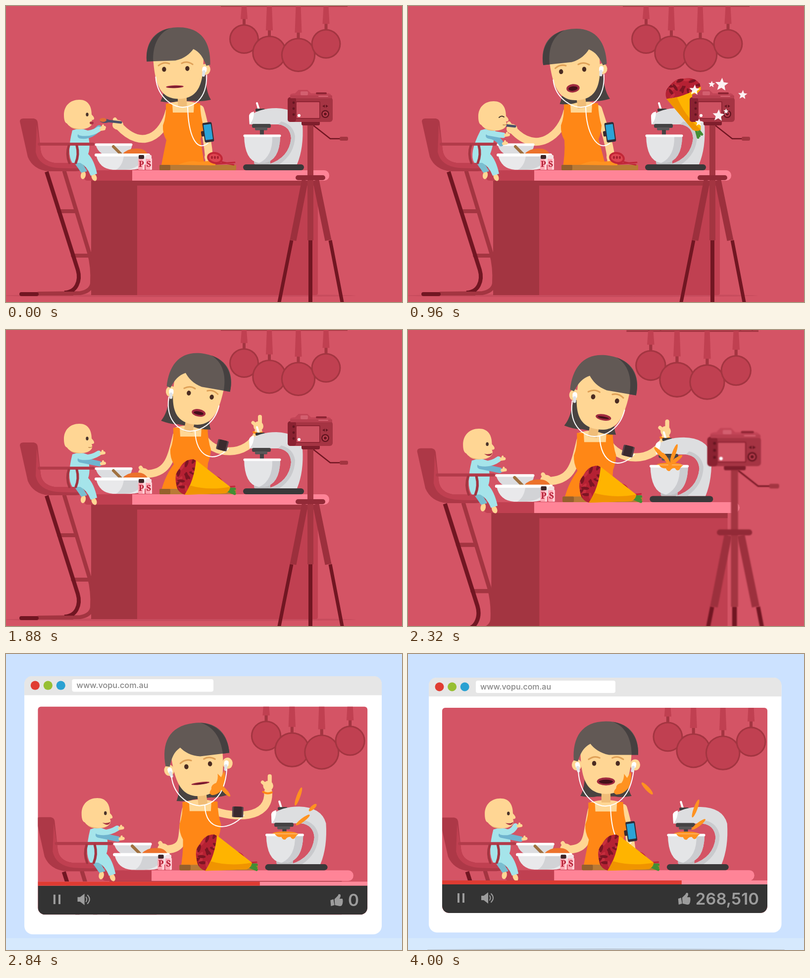
Animation, 800 px wide and 600 px high, one loop 4040 ms. Source, as an HTML page with a canvas:

```html
<!DOCTYPE html>
<html>
<head>
<meta charset="utf-8">
<style>
html, body { margin: 0; width: 100%; height: 100%; overflow: hidden; background: #d45465; }
canvas { display: block; width: 800px; height: 600px; }
</style>
</head>
<body>
<canvas id="stage" width="800" height="600"></canvas>
<script>
const stage = document.getElementById('stage'), c = stage.getContext('2d');
const LOOP = 4040, STEP = 40, ZOOM = 2160, SETTLED = 2840, COUNT = 3120;
const WALL = '#d45465', RED = '#c04051', DEEP = '#a33541', WINE = '#711622', PINK = '#ff8497';
const SKIN = '#ffd694', SHADE = '#f0bd78', ORANGE = '#ff8716', SAUCE = '#ff9220', MINT = '#a5e4ea';
const { sin, cos, abs, min, max, floor, PI } = Math;

const fill = (d, color) => { c.fillStyle = color; c.fill(new Path2D(d)); };
const line = (d, color, w, cap = 'round') => {
  c.strokeStyle = color; c.lineWidth = w; c.lineCap = cap; c.lineJoin = 'round';
  c.stroke(new Path2D(d));
};
const oval = (x, y, rx, ry, color, turn = 0) => {
  c.fillStyle = color; c.beginPath(); c.ellipse(x, y, rx, ry, turn, 0, 7); c.fill();
};
const box = (x, y, w, h, r, color) => {
  c.fillStyle = color; c.beginPath(); c.roundRect(x, y, w, h, r); c.fill();
};
const group = (draw, x = 0, y = 0, turn = 0, sx = 1, sy = sx) => {
  c.save(); c.translate(x, y); c.rotate(turn * PI / 180); c.scale(sx, sy); draw(); c.restore();
};
const mix = (a, b, k) => Array.isArray(a) ? a.map((v, i) => mix(v, b[i], k)) : a + (b - a) * k;
const smooth = k => k * k * (3 - 2 * k);
// Eased value from alternating times and values
function key(t, ...ks) {
  if (t <= ks[0]) return ks[1];
  for (let i = 2; i < ks.length; i += 2)
    if (t < ks[i]) return mix(ks[i - 1], ks[i + 1], smooth((t - ks[i - 2]) / (ks[i] - ks[i - 2])));
  return ks[ks.length - 1];
}
// The baby leans in for a bite and the feeding hand follows
const bite = t => key(t, 0, 0, 720, 1, 1040, 1, 1320, 0);

function room() {
  c.fillStyle = WALL; c.fillRect(-400, -300, 1600, 1200);
  line('M434 0H690M477-20V0M500-20V0M655-20V0M678-20V0', DEEP, 3, 'butt');
  [481, 532, 590.5, 646.5].forEach((x, i) => {
    const y = 67 + 34 * sin(i * .95), r = 28.5 + 5.5 * sin(i * 1.05), h = y - r - 12;
    line(`M${x} ${h - 2}V${y - r}`, DEEP, 6, 'butt');
    fill(`M${x - 5} 0H${x + 5}L${x + 7} ${h}H${x - 7}Z`, RED);
    oval(x, y, r + 1.5, r + 1.5, DEEP);
    oval(x, y, r - 1.5, r - 1.5, RED);
  });
  oval(350, 587, 357, 3, '#c74c5d');
}

// Drawn around the middle of the eye line; turn runs from -1 (left) to 1 (right)
function head(t, turn) {
  const side = turn < 0 ? -1 : 1, a = abs(turn);
  const ear = x => {
    oval(x, 3, 10, 11, SKIN);
    group(() => { box(-5, -8, 9, 13, 5, '#fff'); box(-4, 0, 6, 13, 3, '#dfe3e8'); }, x * .96, 5, x * .2);
  };
  group(() => fill('M-42 10C-42 40-44 52-51 65Q-30 69-18 66H18Q30 69 51 65C44 52 42 40 42 10Z', '#494341'), -4 * turn);
  box(3 * turn - 9, 48, 18, 30, 0, SHADE);
  ear(side * (58 - 20 * a));
  group(() => {
    fill('M-51-40C-51 20-45 61 0 61C45 61 51 20 51-40Z', SKIN);
    if (t >= 2480)
      fill('M50 16L42 29L36 21Q36 32 31 39Q20 41 20 50Q12 58 20 62Q33 63 44 50Q51 40 50 16Z', SAUCE);
  }, 8 * turn);
  ear(-side * (58 - 12 * a));
  group(() => {
    fill('M-64-6C-67-52-48-84 0-84C45-84 66-57 64-17H6C-12-20-24-30-31-39C-44-32-50-22-56-4Z', '#625955');
    fill('M14-83C46-78 66-52 64-17H51C51-50 38-74 14-83Z', '#454040');
  }, 8 * turn, 0, 0, side, 1);
  for (const s of [-1, 1]) {
    const x = 14 * turn + s * 23.5;
    oval(x, 0, 4.2, 5, '#4b2c22');
    line(`M${x - s * 11}-11Q${x}-16 ${x + s * 11}-8`, '#dfa158', 3);
  }
  const open = t < SETTLED ? .5 - .5 * cos((t - SETTLED) * PI / 205) : key(t, SETTLED, 0, 3100, .85);
  const w = 18 - 5 * open * a, h = 2.5 + 6.5 * open;
  oval(17 * turn, 36, w, h, '#a02b40');
  oval(17 * turn, 36.5, w - 4, max(h - 4, .7), '#431019');
}

function limb([sx, sy, ax, ay, bx, by, hx, hy]) {
  line(`M${sx} ${sy}C${ax} ${ay} ${bx} ${by} ${hx} ${hy}`, SKIN, 16);
}

function woman(t) {
  const b = key(t, 0, 358, 960, 350, 1180, 350, 1460, 373, 2560, 373, SETTLED, 351, 3100, 358);
  const tilt = key(t, 0, -2, 960, -6, 1180, -6, 1460, 10, 2560, 10, SETTLED, -7, 3100, 0);
  const turn = key(t, 1160, -1, 1420, 1, 2580, 1, 2800, 0);
  const chin = 160 + key(t, 0, 0, 960, 2, 2520, 2, SETTLED, -2, 3100, -7);
  const up = key(t, 1400, 0, 1720, 1, 2880, 1, 3120, 0);
  const high = key(t, 2520, 0, SETTLED, 1);
  const rest = key(t, 1080, 0, 1360, 1);

  const hang = [b + 34, 209, b + 42, 235, 409, 280, 411, 318];
  const raised = [b + 24, 214, 415, 255 - 25 * high, 488, 260 - 26 * high, 510 - 25 * high, 207 - 29 * high];
  const right = mix(hang, raised, up);
  limb(right);
  group(() => {
    oval(0, -3, 10, 10, SKIN);
    if (up > .4) {
      line('M3-8L3-22', SKIN, 8); line('M-4-4L-11-10', SKIN, 7);
      line('M-10 9Q-2 14 7 10', ORANGE, 4);
    }
  }, right[6], right[7] - 9);

  const [lx, ly] = mix(mix([228, 243], [212, 251], bite(t)), [280, 292], rest);
  limb([b - 28, 213, b - 40, 262, lx + 48, ly + 52 * (1 - rest), lx, ly]);
  oval(lx - 2, ly - 2, 11, 10, SKIN);
  line(`M${lx - 2} ${ly - 4}L${lx - 8} ${ly - 13}`, SKIN, 8);
  if (t < 1300) {
    line(`M${lx + 4} ${ly - 7}L${lx - 22} ${ly - 10}`, '#4b5069', 5);
    oval(lx - 28, ly - 10, 10, 4, '#4b5069');
    if (t < 400) oval(lx - 32, ly - 12, 7, 4, '#e16f35');
  }

  fill(`M${b - 32} 198Q${b} 188 ${b + 32} 198L${b + 30} 222H${b - 30}Z`, SKIN);
  fill(`M${b - 35} 198H${b - 22}L${b - 21} 216H${b + 21}L${b + 22} 197H${b + 34}Q${b + 35} 225 ${b + 41} 242Q${b + 40} 258 ${b + 35} 270L403 338H311Q318 300 ${b - 34} 272Q${b - 42} 258 ${b - 41} 242Q${b - 34} 225 ${b - 35} 198Z`, ORANGE);
  group(() => { c.translate(0, -33); head(t, turn); }, b, chin, tilt);

  const r = tilt * PI / 180;
  const bud = s => {
    const x = s * (s * turn < -.2 ? 48 : 55);
    return `${b + x * cos(r) + 18 * sin(r)} ${chin - 18 * cos(r) + x * sin(r)}`;
  };
  const jx = b + 9;
  const [px, py] = mix([408, 256], [437 - 12 * high, 234 - 16 * high], up);
  line(`M${bud(-1)}C${b - 52} 190 ${b - 15} 207 ${jx - 8} 205C${b + 18} 204 ${b + 48} 192 ${bud(1)}`, '#fff', 2);
  line(`M${jx} 204C${jx + 1} 258 ${px - 25 + up * 8} ${py + 42 - up * 4} ${px + up * 12} ${py + 22 - up * 16}`, '#fff', 2);
  group(() => {
    if (up > .5) {
      box(-11, -11, 22, 21, 2, '#57434a'); box(-8, -11, 16, 21, 2, '#3b2a2e');
    } else {
      box(-14, -4, 16, 11, 2, '#3b2a2e');
      box(-9, -20, 19, 40, 3, '#302d37');
      box(-7, -16, 15, 31, 1, '#2ba3d7');
    }
  }, px, py, up > .5 ? 14 - 12 * high : -8);
}

function counter() {
  box(172, 350, 458, 236, 4, RED);
  c.fillStyle = DEEP; c.fillRect(172, 354, 93, 232); c.fillRect(265, 354, 365, 10);
  box(158, 333, 200, 21, [6, 0, 0, 6], RED);
  box(255, 333, 398, 21, [0, 10, 10, 0], PINK);
}

function food() {
  box(310, 322, 155, 11, 2, '#b97a35'); box(310, 322, 22, 11, 2, '#96602c');
  fill('M348 322Q370 311 390 316L420 313Q434 316 422 323Z', SAUCE);
  oval(422, 308, 16, 12, '#c22737', .2); oval(422, 308, 12, 8, '#de4551', .2);
  for (let x = 416; x < 430; x += 6) oval(x, 307, 2, 3, '#a51f2d');
  line('M424 320L462 317M436 316L460 322', '#bf2738', 3);
  fill('M181 280H255Q253 305 218 306Q186 304 181 280Z', '#dcdde0');
  line('M182 281H253', '#fff', 5);
  line('M217 285L232 300', '#a0713f', 6);
  fill('M234 301Q246 288 264 289Q280 288 287 301Z', '#ec722b');
  fill('M182 302H290Q286 331 252 332H216Q188 330 182 302Z', '#e9e9eb');
  fill('M210 304H238Q235 325 222 332H240Q272 330 279 304Z', '#d2d3d6');
  line('M182 302H288', '#fff', 6);
  c.font = 'bold 17px "Noto Serif", "Liberation Serif", serif';
  c.textAlign = 'center';
  [['P', 267, '#3c2427'], ['S', 282, '#f4dfe1']].forEach(([s, x, cap]) => {
    box(x, 309, 13, 23, 2, '#ffa6b2'); box(x + 9, 309, 4, 23, 1, '#ffd0d6');
    box(x + 1, 302, 11, 8, 2, cap);
    c.fillStyle = '#b41f35'; c.fillText(s, x + 6.5, 326);
  });
}

function baby(t) {
  const lean = bite(t), reach = key(t, 1400, 0, 1700, 1);
  const wave = t > 2300 ? .5 - .5 * cos((t - SETTLED) / 1160 * PI * 5) : 0;
  const x = 25 * lean, top = x / 2;
  oval(156, 343, 5, 8, SKIN, .2); oval(178, 347, 5, 8, SKIN, -.4);
  fill('M146 305L164 335L152 338L136 315Z', '#79bed0');
  fill(`M${134 + top} 252Q${150 + top} 246 ${164 + top} 252Q172 285 166 300Q178 312 184 340L171 344Q164 325 150 318H134Q122 300 ${134 + top} 252Z`, MINT);
  const arm = (sy, hx, hy, color) => {
    line(`M${150 + top} ${sy}Q${170 + top} ${sy + 4} ${hx - 11} ${hy + 1}`, color, 11);
    line(`M${hx - 6} ${hy + 1}L${hx} ${hy}`, SKIN, 6);
    line(`M${hx - 4} ${hy}L${hx - 3} ${hy - 4}`, SKIN, 4);
  };
  arm(263, 199, mix(246 + 32 * lean, 270, reach), '#6fb4cf');
  arm(257, 198 + 5 * lean - 9 * wave, mix(249 + 12 * lean, 249, reach) - 5 * wave, MINT);
  group(() => {
    oval(147, 238, 21, 12, SHADE);
    fill('M117 221C117 202 130 190 148 190C166 190 173 203 173 220Q179 226 178 229Q177 231 173 231Q177 239 169 245Q158 252 143 248Q128 246 123 238Q117 236 117 221Z', SKIN);
    if (lean > .6) line('M159 223Q164 218 169 222', '#47322b', 2);
    else oval(164, 220, 2.7, 3.7, '#47322b');
    if (t < 400) oval(173, 237, 4, 3, '#a73443');
    else if (t > 2280) fill('M158 239Q168 241 174 237Q170 248 158 239Z', '#a73443');
    else line('M167 238Q171 239 174 237', '#b98047', 1.5);
  }, x, 3 * lean);
}

function chair(t) {
  line('M118 336L168 500Q176 530 174 562Q172 578 150 582L66 583', DEEP, 8);
  line('M107 416H140M135 506H168', DEEP, 8);
  line('M82 336L145 535Q150 552 143 566Q136 580 118 581', WINE, 8, 'butt');
  line('M31 584H62', WINE, 8); line('M66 583H136', DEEP, 8, 'butt');
  fill('M28 234Q28 228 35 228H56Q63 229 64 236L70 292Q73 314 98 318H158Q167 320 164 326Q156 335 140 335H86Q55 332 44 306Z', '#ad3847');
  fill('M62 240L70 292Q73 314 98 318H158Q167 320 164 326Q150 331 102 328Q66 324 60 296Z', RED);
  baby(t);
  line('M67 280H176', '#b23b4a', 6);
  line('M127 283Q121 300 128 318M143 283Q148 301 141 318', DEEP, 5);
}

function mixer(t) {
  const on = t > 2200, shake = t > 1960 && t < SETTLED ? .7 * sin(t / 17) : 0;
  box(479, 321, 123, 12, 6, '#3a3839');
  group(() => {
    box(501, 312, 33, 9, 3, '#bfc0c2');
    line('M511 210L507 197', '#fff', 4); box(504, 208, 19, 6, 2, '#3d3b3c');
    fill('M492 240L491 224Q511 207 546 207Q590 208 599 240Q602 287 588 321H530Q572 308 576 268Q574 243 550 240Z', '#dddee0');
    fill('M550 240Q574 243 576 268Q572 308 530 321H552Q583 300 584 264Q580 240 556 234Z', '#c9cacd');
    fill('M491 222Q492 216 501 214Q501 231 492 240Z', '#fff');
    box(497, 239, 38, 8, 3, '#454344'); box(503, 246, 25, 6, 2, '#5a5758'); box(513, 251, 8, 10, 0, '#454344');
    if (on) oval(518, 261, 25, 5, SAUCE);
    fill('M481 263H554Q553 314 521 318H510Q482 313 481 263Z', '#e4e5e7');
    fill('M538 264H554Q553 314 521 318H512Q539 305 538 264Z', '#cbccd0');
    line('M482 263H553', '#fff', 5);
    if (on) fill('M498 261H545Q540 264 537 270Q532 273 529 267Q523 266 519 272Q514 274 511 267Q502 268 498 261Z', SAUCE);
  }, shake, 0);
  if (!on) return;
  const drop = (angle, far, len) => group(() => oval(far, 0, len, 3.7, SAUCE), 518, 260, angle);
  const burst = key(t, 2200, 0, 2520, 1, SETTLED, 1.05, 3100, .72);
  drop(-70, 74 * burst, 19);
  drop(-37, 42 * burst, 17);
  // Two loose drops fly off, one after the other
  [[2280, -122], [2600, -43]].forEach(([start, angle]) => {
    const k = (t - start) / 480;
    if (k > 0 && k < 1) drop(angle, 150 * k, 16 - 12 * k);
  });
  // One hits the face and drips away
  const [x, y] = key(t, 2260, [510, 250], 2520, [429, 160], SETTLED, [399, 175], 3100, [440, 170]);
  group(() => oval(0, 0, 16, 4, SAUCE), x, y, 47);
}

function roses() {
  c.save();
  c.clip(new Path2D('M386 266L378 262Q360 262 351 280Q339 293 344 312Q346 330 362 334L392 325Z'));
  c.fillStyle = '#b52133'; c.fillRect(340, 260, 60, 80);
  let seed = 11;
  const random = () => (seed = seed * 16807 % 2147483647) / 2147483647;
  for (let i = 0; i < 22; i++)
    oval(343 + 42 * random(), 264 + 68 * random(), 8, 3, i % 3 ? '#7c1523' : '#c62e3e', PI * random());
  c.restore();
}

function bouquet(t) {
  if (t < 880) return;
  const k = max(0, min(1, (t - 960) / 480));
  const y = mix(198, 300, k) - 330 * k * (1 - k);
  group(() => {
    c.translate(-400, -300);
    line('M445 322L462 322M446 317L461 328M448 326L462 332', '#438e34', 5);
    roses();
    fill('M384 264L453 318Q452 327 443 331L361 334Q380 306 384 264Z', '#ffb400');
    fill('M453 318Q452 327 443 331L361 334Q367 325 371 315Q409 326 453 318Z', '#f09400');
  }, mix(573, 400, k), y, mix(52, 0, k), key(t, 880, .6, 960, 1));
}

function star(x, y, r) {
  c.beginPath();
  for (let i = 0; i < 10; i++) {
    const a = i * PI / 5 - 1.5, q = i % 2 ? r * .45 : r;
    c.lineTo(x + q * cos(a), y + q * sin(a));
  }
  c.fill();
}

// Stars burst outwards on a golden-angle spiral
function sparkle(t) {
  const k = (t - 840) / 120;
  if (k < 0 || k > 2.6) return;
  c.fillStyle = '#fff';
  c.globalAlpha = k < 1 ? .92 : .92 * (2.6 - k) / 1.6;
  for (let i = 0; i < 7; i++) {
    const a = (i * 137.5 - 65) * PI / 180;
    const far = (45 + 15 * cos((i - 3.2) * 1.3)) * (.5 + .5 * Math.sqrt(k));
    star(618 + far * cos(a), 193 + far * sin(a), (14 - 1.4 * i) * min(1, .4 + .6 * k));
  }
  c.globalAlpha = 1;
}

function camera(t) {
  line('M604 353L580 475M626 353L651 475', '#9c303d', 13, 'butt');
  line('M577 475L551 605M655 475L680 605', WINE, 7, 'butt');
  line('M615 241V475', DEEP, 12, 'butt'); line('M615 475V605', WINE, 8, 'butt');
  box(585, 343, 60, 10, 5, '#922a37');
  line('M622 243L655 269H677', WINE, 2.5); box(674, 265, 17, 8, 3, DEEP);
  box(597, 233, 37, 9, 3, '#7f1e2c');
  fill('M574 188V180Q576 177 584 177L591 170H609L616 177H652Q659 178 659 190Z', '#c34557');
  box(595, 173, 15, 8, 2, '#d35f6f'); box(626, 175, 22, 4, 2, '#8f2534');
  box(569, 185, 91, 50, 6, '#a53443'); box(569, 185, 17, 50, 5, '#8a2231');
  box(574, 181, 85, 6, 2, '#b83f50');
  box(585, 193, 50, 36, 2, '#8f2534'); box(587, 195, 46, 32, 1, '#ce5262');
  oval(592, 222, 3, 3, '#fff');
  for (let y = 196; y < 224; y += 12) oval(581, y, 2.4, 2.4, '#641520');
  oval(645, 219, 8, 8, '#641520'); oval(645, 219, 5.5, 5.5, RED); oval(645, 219, 3, 3, '#641520');
  fill('M639 203l5-3v6zM651 203l-5-3v6z', '#641520');
  line('M632 183H650', '#d96473', 2);
  sparkle(t);
}

function scene(t) {
  const [x, y] = key(t, ZOOM, [400, 300], SETTLED, [442.6, 404.6]);
  const s = key(t, ZOOM, 1, 2520, 1.1, SETTLED, 1.0245, 4000, 1.016);
  group(() => {
    c.translate(-400, -300);
    room(); woman(t); counter(); food(); chair(t); mixer(t); bouquet(t);
  }, x, y, 0, s);
  if (t >= SETTLED) return;
  const [cx, cy, cs] = key(t, ZOOM, [615, 203, 1], 2520, [722, 287, 1.45], SETTLED, [1000, 400, 2]);
  group(() => {
    if (cs > 1.1) c.filter = `blur(${7 * (cs - 1)}px)`;
    c.translate(-615, -203); camera(t);
  }, cx, cy, 0, cs);
}

function controls(t) {
  const gray = '#9c9c9c';
  box(69, 467, 657, 58, [0, 0, 14, 14], '#333');
  if (t > 2640) {
    c.fillStyle = '#ff8a9b'; c.fillRect(69, 459, 657, 8);
    c.fillStyle = '#de3b32'; c.fillRect(69, 459, 442.5 + .0356 * (t - SETTLED), 8);
  }
  line('M102 485V504M112 485V504', gray, 4, 'butt');
  fill('M148 490h5l9-7v23l-9-7h-5z', gray);
  line('M165 490Q168 494.500 165 499M168 486Q176 494.500 168 503', gray, 2);
  const likes = 12205 * max(0, (t - COUNT) / STEP);
  const text = likes.toLocaleString('en-US');
  c.font = '600 33px Inter, "Open Sans", sans-serif';
  c.textAlign = 'right'; c.fillStyle = gray; c.fillText(text, 709, 508);
  group(() => fill('M0 12L6 10L8 22L1 24ZM8 10L15 3Q16-2 20 1Q21 5 18 9L24 9Q26 15 23 22Q22 24 18 24L9 22Z', gray),
    709 - c.measureText(text).width - 35, 484);
}

function browser(t) {
  const size = key(t, ZOOM, 2.35, SETTLED, 1.0133, 3400, 1.003, 4000, 1);
  c.fillStyle = '#cce2ff'; c.fillRect(0, 0, 800, 600);
  c.fillStyle = '#d6e9fd'; c.fillRect(0, 576, 800, 24);
  if (t > SETTLED) line('M40 600Q400 596.500 760 600', '#b4bec9', 2);
  const frame = draw => group(() => { c.translate(-412, -276); draw(); }, 412, 276, 0, size);
  c.save();
  frame(() => {
    box(42, 48, 712.5, 516.5, 17, '#fff');
    box(42, 48, 712.5, 38, [15, 15, 0, 0], '#e6e6e6');
    ['#e03d32', '#97bf32', '#2aa1d2'].forEach((color, i) => oval(63.5 + 25.6 * i, 66.5, 9, 9, color));
    box(137, 54, 282, 25, 4, '#fff');
    c.font = '500 16px Inter, "Open Sans", sans-serif';
    c.textAlign = 'left'; c.fillStyle = '#858585'; c.fillText('www.vopu.com.au', 146, 72);
    c.beginPath(); c.roundRect(69, 109, 657, 416, [6, 6, 14, 14]);
  });
  c.clip();
  scene(t);
  frame(() => controls(t));
  c.restore();
}

function tick(now) {
  const t = floor(now % LOOP / STEP) * STEP;
  const zoom = max(0, min(1, (t - ZOOM) / (SETTLED - ZOOM)));
  stage.style.filter = zoom > 0 && zoom < 1 ? `blur(${1.1 * sin(PI * zoom)}px)` : 'none';
  (t > ZOOM ? browser : scene)(t);
  requestAnimationFrame(tick);
}
requestAnimationFrame(tick);
</script>
</body>
</html>
```
